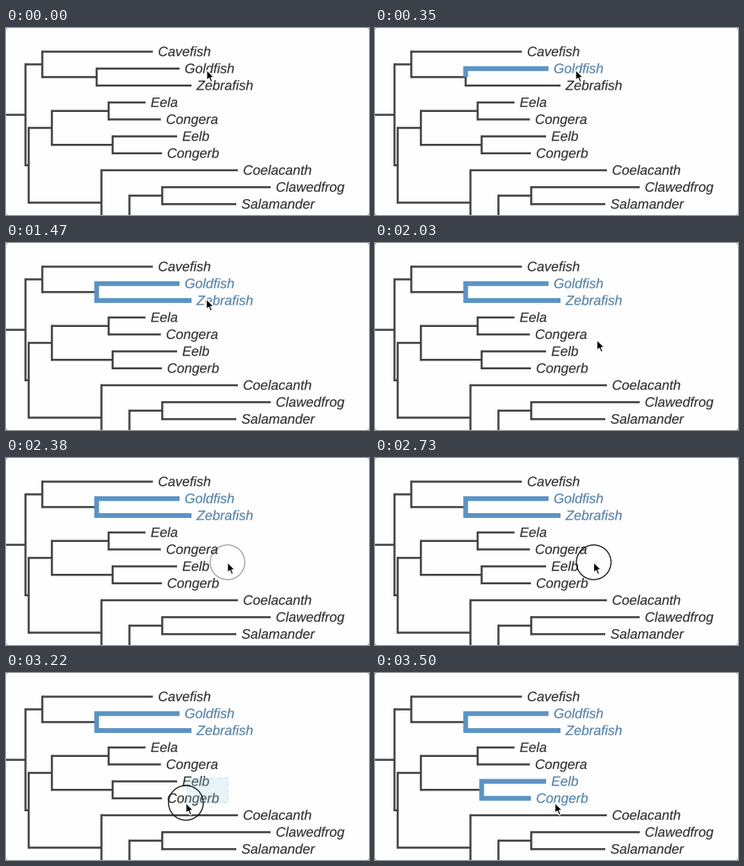
A matplotlib script that plays this animation: 454x234 px, repeating every 3.99 s.

```python
import matplotlib.pyplot as plt
import numpy as np
from matplotlib.animation import FuncAnimation
from matplotlib.patches import Circle, FancyBboxPatch, PathPatch, Polygon, Rectangle
from matplotlib.textpath import TextPath
from matplotlib.transforms import Affine2D

W, H, DPI = 454, 234, 100
PX = 72 / DPI  # points per pixel
FRAMES, INTERVAL = 57, 70

INK, TEXT = "#414141", "#303030"
BLUE, BLUE_TEXT = "#5b94c4", "#5381a8"
FONT = dict(family="Liberation Sans", style="italic")

# A node is (x, child, child), a leaf is (x, name).
TREE = (24.4,
        (45.4, (183.7, "Cavefish"),
         (113.4, (217, "Goldfish"), (232, "Zebrafish"))),
        (28.4,
         (57.4,
          (128.4, (174.5, "Eela"), (193.7, "Congera")),
          (133.4, (214, "Eelb"), (195, "Congerb"))),
         (119.4, (290, "Coelacanth"),
          (154.4, (195.4, (331, "Clawedfrog"), (288, "Salamander")),
           (W, None)))))
TOP, ROW = 29.6, 21.2
LOWER_CLADE = 13.15  # row of the unnamed clade below the stage

PICKED = {"Goldfish": 5, "Zebrafish": 21, "Eelb": 50, "Congerb": 50}

# pointer legs: (start, end, target)
HOME = (251, 52.5)
LEGS = [(9, 15, (250.5, 70)), (25, 30, (280, 126)), (30, 33, (277, 130.5)),
        (38, 39, (273.5, 130.5)), (39, 46, (225, 162.5))]
PRESSES = [(3, 5), (18, 21), (34, 50)]
DRAG = (39, 50)
ANCHOR = np.array((277, 131))
ARROW = np.array([(0, 0), (0, 13), (3, 10.2), (5.1, 15.2),
                  (7.4, 14.2), (5.3, 9.4), (9.4, 9.4)])


def pointer(t):
    pos = np.array(HOME, float)
    for start, end, target in LEGS:
        u = np.clip((t - start) / (end - start), 0, 1)
        pos += (np.array(target) - pos) * (1 - (1 - u) ** 1.55)
    return pos


fig = plt.figure(figsize=(W / DPI, H / DPI), dpi=DPI, facecolor="#b8b8b8")
ax = fig.add_axes([0, 0, 1, 1])
ax.set_xlim(0, W)
ax.set_ylim(H, 0)
ax.axis("off")
ax.add_patch(FancyBboxPatch((0, 0), W, H, boxstyle="round,pad=0,rounding_size=4",
                            fc="#fefefe", ec="none", zorder=0))
labels, marks = {}, {}


def branch(xs, ys, color=INK, width=2.5, cap="butt", z=1):
    line, = ax.plot(xs, ys, color=color, lw=width * PX, solid_capstyle=cap,
                    solid_joinstyle="miter", snap=False, zorder=z)
    return line


def add_label(x, y, name):
    place = Affine2D().scale(1, -1).translate(x + 6.4, y + 5.6)
    glyphs = place.transform_path(TextPath((0, 0), name, size=17, prop=FONT))
    labels[name] = ax.add_patch(PathPatch(glyphs, lw=0.1, snap=False, zorder=3))


def grow(node, parent_x, rows):
    """Draw a subtree and return its height on the stage."""
    x, *kids = node
    if kids == [None]:
        return TOP + ROW * LOWER_CLADE
    if len(kids) == 1:
        y = TOP + ROW * next(rows)
        add_label(x, y, kids[0])
    else:
        ys = [grow(kid, x, rows) for kid in kids]
        y = sum(ys) / 2
        branch([x, x], ys, cap="projecting")
        for (end, *rest), kid_y in zip(kids, ys):
            if rest[0] in PICKED:
                marks[rest[0]] = branch([x, x, end], [y, kid_y, kid_y], BLUE, 6, z=2)
    branch([parent_x, x], [y, y])
    return y


grow(TREE, -5, iter(range(10)))

box = ax.add_patch(Rectangle((0, 0), 0, 0, fc=(0.68, 0.85, 0.9, 0.28),
                             ec=(0.68, 0.85, 0.9, 0.7), lw=PX, ls=(0, (5, 4)), zorder=4))
ring = ax.add_patch(Circle(HOME, 21.7, fill=False, ec="#111111", lw=1.3 * PX, zorder=5))
arrow = ax.add_patch(Polygon(ARROW, fc="black", ec="white", lw=1.2 * PX,
                             snap=False, zorder=6))


def draw(i):
    for name, label in labels.items():
        on = i >= PICKED.get(name, FRAMES)
        label.set_color(BLUE_TEXT if on else TEXT)
        if name in marks:
            marks[name].set_visible(on)

    pos = pointer(i)
    arrow.set_xy(ARROW + pos)
    ring.center = tuple(pos)
    ring.set_alpha(max(min(0.4 * (i - a + 1), 1) if a <= i < b else 0
                       for a, b in PRESSES))

    # the selection trails the pointer slightly
    corner = pointer(i - 0.5)
    box.set_xy(corner)
    box.set_width(ANCHOR[0] - corner[0])
    box.set_height(ANCHOR[1] - corner[1])
    box.set_visible(DRAG[0] <= i < DRAG[1])
    return [*labels.values(), *marks.values(), box, ring, arrow]


anim = FuncAnimation(fig, draw, frames=FRAMES, interval=INTERVAL,
                     init_func=lambda: draw(0), repeat=True, repeat_delay=0)
plt.show()
```
